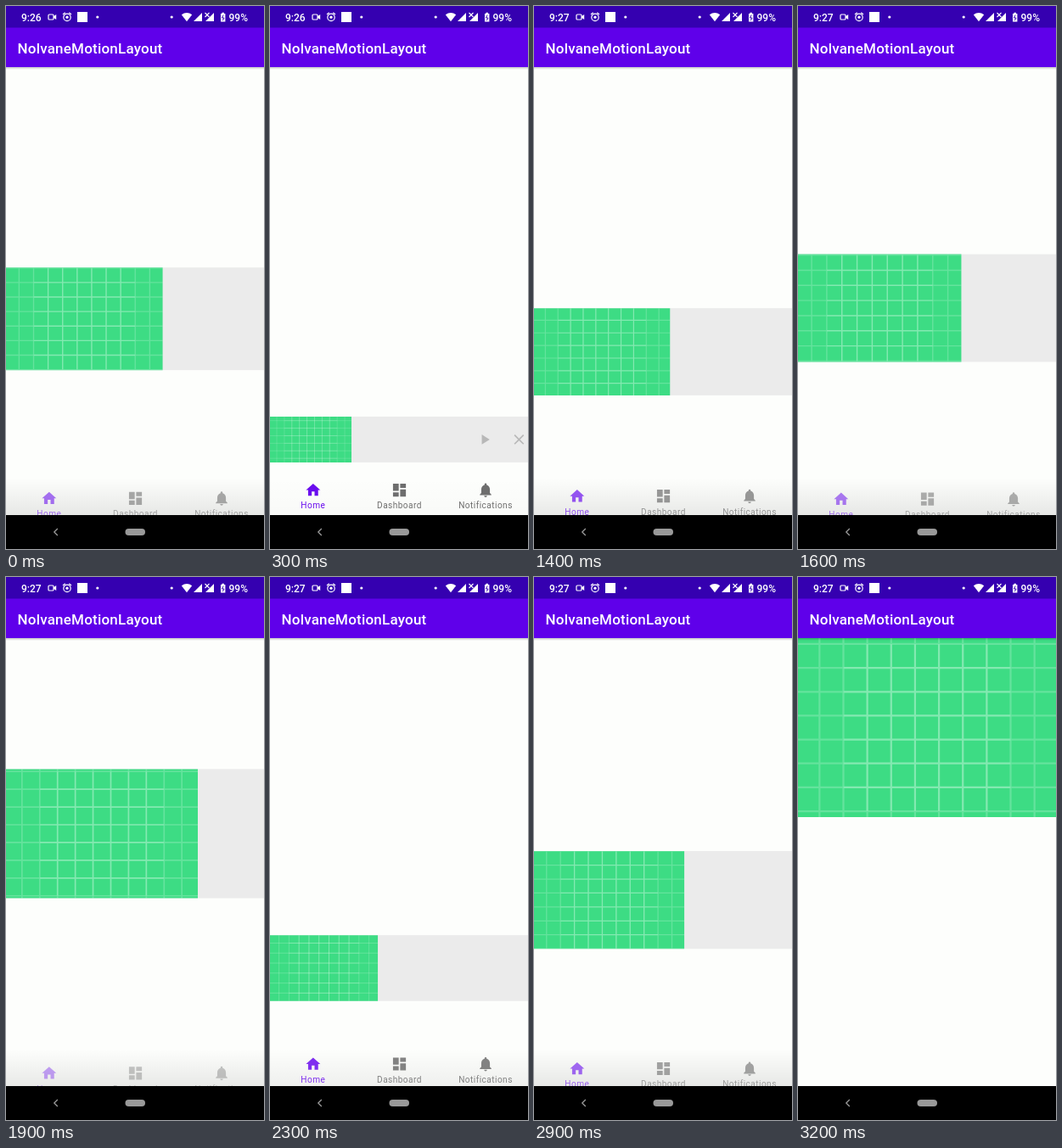
An HTML page for the animation above (3300 ms loop, 304 px wide and 640 px high).

```html
<!DOCTYPE html>
<html lang="en">
<head>
<meta charset="utf-8">
<title>Motion layout</title>
<style>
  html, body { margin: 0; width: 100%; height: 100%; overflow: hidden; background: #fdfefc; }
  #stage { display: block; width: 304px; height: 640px; font-family: Roboto, sans-serif; }
  .status { font-size: 12px; font-weight: 500; fill: #fff; }
  .title { font-size: 17px; font-weight: 500; letter-spacing: .2px; fill: #fff; }
  .label { font-size: 10.1px; letter-spacing: .45px; text-anchor: middle; }
  .line { fill: none; stroke: #fff; stroke-width: 1.2; }
</style>
</head>
<body>
<svg id="stage" viewBox="0 0 304 640">
  <defs>
    <linearGradient id="drop" x2="0" y2="1">
      <stop offset="0" stop-opacity=".22"/>
      <stop offset="1" stop-opacity="0"/>
    </linearGradient>
    <linearGradient id="haze" x2="0" y2="1">
      <stop offset="0" stop-opacity="0"/>
      <stop offset="1" stop-opacity=".09"/>
    </linearGradient>
  </defs>

  <rect width="304" height="640" fill="#fdfefc"/>

  <!-- Bottom navigation -->
  <rect id="navShade" y="556" width="304" height="44" fill="url(#haze)"/>
  <g id="nav"></g>

  <!-- Player -->
  <rect id="bar" width="304" fill="#ebebeb"/>
  <svg id="cover" viewBox="0 0 108 108" preserveAspectRatio="xMidYMid slice">
    <rect width="108" height="108" fill="#3ddc84"/>
    <path id="grid" stroke="#fff" stroke-opacity=".2" stroke-width=".8"/>
    <path id="innerGrid" stroke="#fff" stroke-opacity=".2" stroke-width=".8"/>
  </svg>
  <g id="controls" fill="#808080">
    <path transform="translate(242.8 -10.1) scale(.844)" d="M8 5v14l11-7z"/>
    <path transform="translate(283.3 -10.1) scale(.844)" d="M19 6.4 17.6 5 12 10.6 6.4 5 5 6.4 10.6 12 5 17.6 6.4 19 12 13.4 17.6 19 19 17.6 13.4 12z"/>
  </g>

  <!-- App bar and status bar -->
  <rect y="72" width="304" height="3" fill="url(#drop)"/>
  <rect width="304" height="72" fill="#5f00ea"/>
  <rect width="304" height="25.5" fill="#3500b0"/>
  <text class="title" x="13.5" y="56">NolvaneMotionLayout</text>
  <text class="status" id="clock" x="18" y="17.5">9:26</text>
  <text class="status" x="262.5" y="17.5">99%</text>
  <rect class="line" x="50" y="10" width="6" height="6" rx="1"/>
  <path d="M56 12.3l3.2-2.3v6l-3.2-2.3z" fill="#fff"/>
  <circle class="line" cx="72" cy="13.4" r="4.2"/>
  <path class="line" d="M67 10l2.7-2.3M77 10l-2.7-2.3"/>
  <circle cx="72" cy="13.2" r="1.6" fill="#fff"/>
  <g fill="#fff">
    <rect x="84" y="7" width="12" height="12"/>
    <circle cx="107.8" cy="13" r="1.6"/>
    <circle cx="195.2" cy="13" r="1.6"/>
    <path d="M206.8 10.3Q213 5.8 219.2 10.3L213 18.2z"/>
    <path d="M231 8v10h-10zM245 8v10h-10z"/>
    <path d="M253 9h1.4V7.8h2.6V9h1.4v9.4H253z"/>
  </g>
  <path d="M234.5 8l5 5m0-5l-5 5" stroke="#fff" stroke-width="1.1"/>
  <path d="M256.2 10.6l-1.8 3.4h2.6l-1.6 3" fill="none" stroke="#3500b0"/>

  <!-- System navigation -->
  <rect y="600" width="304" height="40" fill="#000"/>
  <path d="M60.8 616l-4 4 4 4" fill="none" stroke="#999" stroke-width="1.3"/>
  <rect x="140.5" y="616" width="23.5" height="8" rx="4" fill="#999"/>
</svg>

<script>
const el = id => document.getElementById(id);
const set = (node, attrs) => {
  for (const name in attrs) node.setAttribute(name, attrs[name]);
};
const mix = (a, b, p) => a + (b - a) * p;

const LOOP = 3300, STEP = 100, LEAD = 4;

// [ms, progress]: 0 = expanded player, 1 = docked player
const steps = [
  [0, .543], [100, .685], [200, .828], [300, .947], [400, .988], [500, 1],
  [1000, 1], [1100, .873], [1600, .507], [1700, .425], [1800, .365],
  [1900, .355], [2000, .44], [2100, .58], [2200, .717], [2300, .805],
  [2400, .885], [2500, .92], [2600, .9], [2700, .82], [2800, .72],
  [2900, .577], [3000, .38], [3100, .14], [3200, 0], [LOOP, 0]
];

const tabs = [
  ["Home", 50.8, "#6200ee", "M10 20v-6h4v6h5v-8h3L12 3 2 12h3v8z"],
  ["Dashboard", 152.5, "#666", "M3 13h8V3H3zm0 8h8v-6H3zm10 0h8V11h-8zm0-18v6h8V3z"],
  ["Notifications", 254, "#666",
    "M12 22c1.1 0 2-.9 2-2h-4c0 1.1.9 2 2 2zm6-6v-5c0-3.1-1.6-5.6-4.5-6.3V4a1.5 1.5 0 0 0-3 0v.7C7.6 5.4 6 7.9 6 11v5l-2 2v1h16v-1z"]
];
el("nav").innerHTML = tabs.map(([name, x, color, icon]) => `
  <g fill="${color}">
    <path transform="translate(${x - 10.1} 559.2) scale(.844)" d="${icon}"/>
    <text class="label" x="${x}" y="591.2">${name}</text>
  </g>`).join("");

function gridPath(first, last, from, to) {
  let d = "";
  for (let i = first; i <= last; i += 10) d += `M${i} ${from}V${to}M${from} ${i}H${to}`;
  return d;
}
set(el("grid"), { d: gridPath(9, 99, 0, 108) });
set(el("innerGrid"), { d: gridPath(29, 79, 19, 89) });

function progressAt(t) {
  const i = steps.findIndex(([ms]) => ms > t);
  const [t0, p0] = steps[i - 1], [t1, p1] = steps[i];
  return mix(p0, p1, (t - t0) / (t1 - t0));
}

function draw(t) {
  const p = progressAt(t);
  const y = mix(72, 507, p), height = mix(211, 45.2, p);
  set(el("bar"), { y, height });
  set(el("cover"), { y, height, width: mix(304, 84.4, p) });
  set(el("controls"), {
    transform: `translate(0 ${y + height / 2})`,
    opacity: Math.max(0, (p - .9) / .1)
  });
  set(el("nav"), { transform: `translate(0 ${24 * (1 - p)})`, opacity: p });
  set(el("navShade"), { opacity: 4 * p * (1 - p) });
  el("clock").textContent = t < 1300 ? "9:26" : "9:27";
}

const start = performance.now();
function tick() {
  const t = (performance.now() - start + LEAD) % LOOP;
  draw(Math.floor(t / STEP) * STEP);
  requestAnimationFrame(tick);
}
tick();
</script>
</body>
</html>
```
